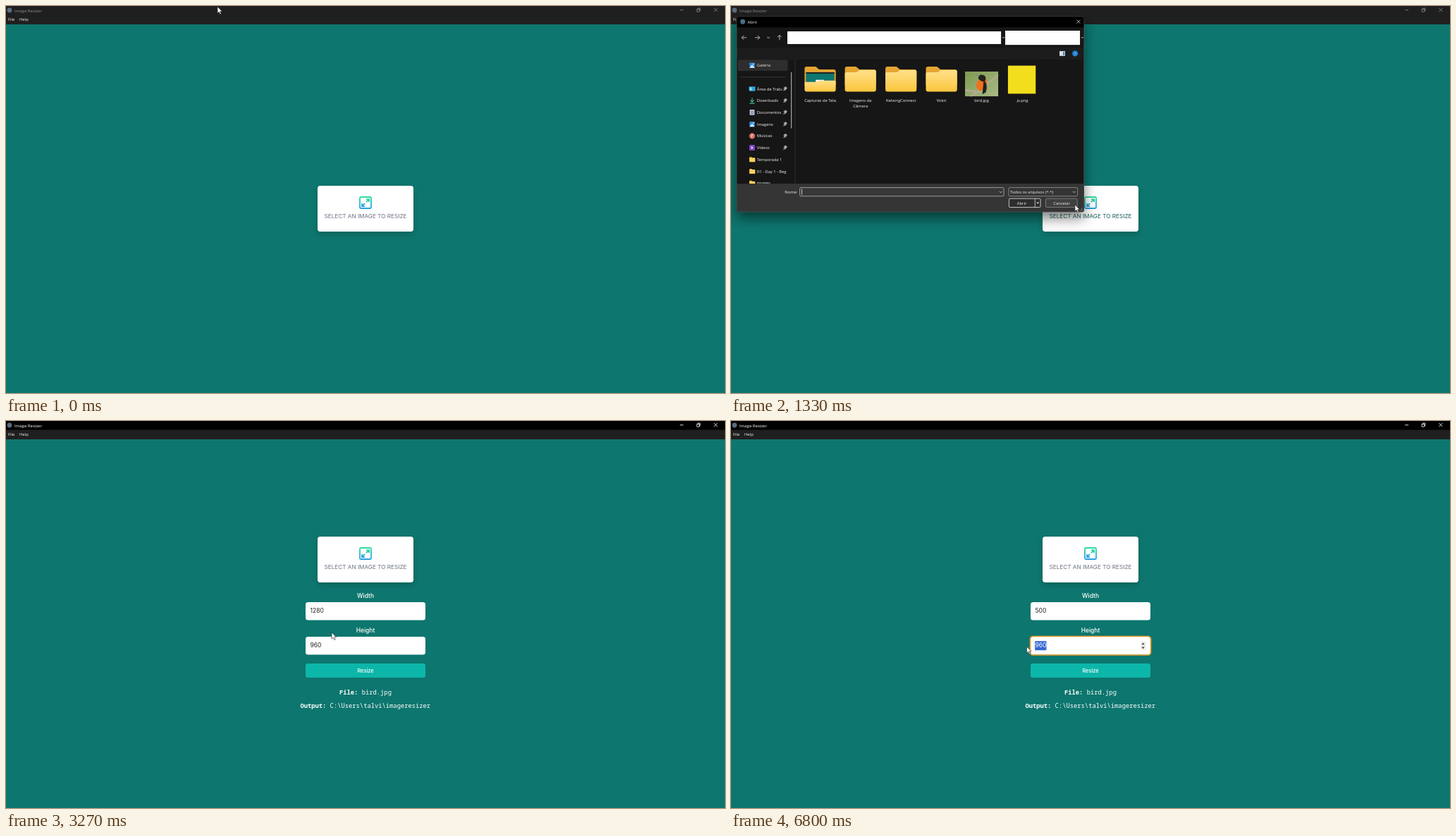
Recreate the animation shown at these times as an HTML page. Size 1020 by 549 pixels, loop 8000 ms.

```html
<!DOCTYPE html>
<html lang="en">
<head>
<meta charset="utf-8">
<title>Image Resizer</title>
<style>
html, body { margin: 0; width: 100%; height: 100%; overflow: hidden; background: #0d766e; }
svg { display: block; width: 100vw; height: 100vh; }
text { white-space: pre; }
.ui { font-family: "Open Sans", "Noto Sans", sans-serif; font-size: 5.9px; fill: #f2f2f2; }
.app { font-family: Inter, sans-serif; font-size: 8.5px; }
.mono { font-family: "Noto Sans Mono", "DejaVu Sans Mono", monospace; font-size: 8.8px; fill: #fff; }
.line { fill: none; stroke: #ddd; stroke-width: .8; }
</style>
</head>
<body>
<svg id="stage" viewBox="0 0 1020 549" preserveAspectRatio="none"></svg>
<script>
const LOOP = 8000, STEP = 1000 / 15;
const stage = document.getElementById('stage');

const rect = (x, y, w, h, fill, more = '') =>
  `<rect x="${x}" y="${y}" width="${w}" height="${h}" fill="${fill}" ${more}/>`;
const line = (d, more = '') => `<path class="line" d="${d}" ${more}/>`;
const dot = (x, y, r, fill) => `<circle cx="${x}" cy="${y}" r="${r}" fill="${fill}"/>`;
const label = (x, y, s, more = '') => `<text class="ui" x="${x}" y="${y}" ${more}>${s}</text>`;
const mid = 'text-anchor="middle"';
const chevron = (x, y, r = 2) => line(`M${x - r} ${y - r / 2}l${r} ${r} ${r} ${-r}`);
const caretDown = (x, y) => `<path d="M${x - 2} ${y - 1}h4l-2 2.3z" fill="#ddd"/>`;

const defs = `<defs>
  <linearGradient id="icon" x1="0" y1="0" x2="0" y2="1">
    <stop offset="0" stop-color="#2fdca0"/><stop offset="1" stop-color="#2a9fe4"/></linearGradient>
  <linearGradient id="fold" x1="0" y1="0" x2="0" y2="1">
    <stop offset="0" stop-color="#ffe08a"/><stop offset="1" stop-color="#fbc63d"/></linearGradient>
  <linearGradient id="meadow" x1="0" y1="0" x2="1" y2="1">
    <stop offset="0" stop-color="#7e9a52"/><stop offset="1" stop-color="#a9bb86"/></linearGradient>
  <filter id="soft" x="-20%" y="-20%" width="140%" height="150%">
    <feDropShadow dx="0" dy="4" stdDeviation="5" flood-opacity=".17"/></filter>
  <filter id="deep" x="-10%" y="-10%" width="120%" height="130%">
    <feDropShadow dx="0" dy="9" stdDeviation="9" flood-opacity=".5"/></filter>
  <clipPath id="win"><rect x="4" y="12" width="502" height="283" rx="4"/></clipPath>
  <clipPath id="side"><rect x="4" y="74" width="84" height="180"/></clipPath>
  <clipPath id="photo"><rect x="334" y="92" width="48" height="36"/></clipPath>
</defs>`;

function topBar() {
  return rect(0, 0, 1020, 26, '#201f1f') + rect(0, 0, 1020, 12.5, '#000', 'id="bar"') +
    dot(5, 6, 3.4, '#5a6b82') +
    label(12, 8.5, 'Image Resizer', 'id="title" style="font-size:6px"') +
    label(3, 21.2, 'File') + label(19, 21.2, 'Help') +
    `<g id="winBtns" fill="none" stroke-width=".8">
      <path d="M956 5.7h5M1004.3 3l5 5m0-5l-5 5M980 4.5h3.6v3.6h-3.6zM981.3 4.3v-1.2h3.5v3.5h-1"/></g>`;
}

function card() {
  return `<g id="card">` + rect(442, 255, 136, 65, '#fff', 'rx="4" filter="url(#soft)"') +
    `<g fill="none" stroke="url(#icon)" stroke-width="1.8" stroke-linejoin="round">
      <rect x="502" y="271" width="16" height="16" rx="1.5"/>
      <path d="M511 278l4-4m-4 .1h4.2v4M509 280l-4 4m0-4v4.2h4"/></g>
    <text id="pick" class="app" x="510" y="300.8" ${mid} style="font-size:8.2px">SELECT AN IMAGE TO RESIZE</text></g>`;
}

const field = (id, y) => rect(425, y, 170, 25.5, '#fff', 'rx="3.5"') +
  rect(424.5, y - .5, 171, 26.5, 'none', `id="${id}Ring" rx="4" stroke="#eda02f" stroke-width="1.7"`) +
  rect(431.2, y + 6.2, 0, 13, '#3367d1', `id="${id}Sel"`) +
  `<text id="${id}" class="app" x="431.5" y="${y + 15.4}"></text>` +
  rect(431, y + 6.2, .6, 13, '#222', `id="${id}Caret"`) +
  `<g id="${id}Spin">` + rect(581, y + 6.5, 8, 12.5, '#f0f0f0') +
  `<path d="M582.4 ${y + 11.2}h4.4l-2.2-2.6zM582.4 ${y + 14.6}h4.4l-2.2 2.6z" fill="#444"/></g>`;

function form() {
  const head = (y, s) => `<text class="app" x="510" y="${y}" ${mid} fill="#fff" font-weight="500">${s}</text>`;
  const info = (x, y, name, value) =>
    `<text class="mono" x="${x}" y="${y}"><tspan font-weight="700">${name}:</tspan> ${value}</text>`;
  return `<g id="form">` + head(250.8, 'Width') + field('w', 257) + head(300, 'Height') + field('h', 306) +
    rect(425, 344, 170, 20, '#0cb6a9', 'rx="3"') +
    `<text class="app" x="510" y="356.7" ${mid} fill="#fff" font-weight="500" style="font-size:7.4px">Resize</text>` +
    info(473, 387.5, 'File', 'bird.jpg') +
    info(417.4, 406.8, 'Output', 'C:\\Users\\talvi\\imageresizer') + `</g>`;
}

function folder(cx, names, filled) {
  const x = cx - 22.5;
  return `<path d="M${x} 88q0-3 3-3h13l5 4h21q3 0 3 3v20h-45z" fill="#e5a532"/>` +
    (filled ? rect(x + 2, 93, 41, 20, '#0d766e') + rect(x + 2, 93, 41, 2, '#202020') + rect(x + 16, 104, 12, 3, '#fff')
      + `<path d="M${x} 109q0-2 2-2h15l4-2h22q2 0 2 2v11q0 3-3 3h-39q-3 0-3-3z" fill="url(#fold)"/>`
      : `<path d="M${x} 95q0-2 2-2h15l4-3h22q2 0 2 2v26q0 3-3 3h-39q-3 0-3-3z" fill="url(#fold)"/>`) +
    names.map((n, i) => label(cx, 136 + i * 8, n, mid)).join('');
}

function bird() {
  return `<g clip-path="url(#photo)">` + rect(334, 92, 48, 36, 'url(#meadow)') +
    `<path d="M340 130L384 96M334 119l24 3" stroke="#b5aa93" stroke-width="2.4" fill="none"/>
    <ellipse cx="358" cy="110" rx="7" ry="10" transform="rotate(28 358 110)" fill="#f0701f"/>
    <path d="M361 105q7 5 3 17l-5 3q1-11 2-20z" fill="#22201f"/>
    <path d="M353 102q1-7 7-5t3 9q-5 2-10-4z" fill="#22201f"/>
    <path d="M354 98l-4-2 4 4z" fill="#778"/></g>`;
}

const miniPic = (x, y) => rect(x - 3.8, y - 3.8, 7.6, 7.6, '#2f8fdd', 'rx="1"') +
  `<path d="M${x - 3.8} ${y + 3.8}l3.8-4.6 3.8 4.6z" fill="#d9eefc"/>` + dot(x + 1.8, y - 1.8, .8, '#fff');
const miniFolder = (x, y) => rect(x - 4, y - 3.5, 4, 3, '#e5a532', 'rx=".8"') +
  rect(x - 4, y - 2.4, 8.4, 6, '#fdd05c', 'rx=".8"');

function sidebar() {
  const glyph = [
    y => rect(22, y - 3.2, 9, 6.4, '#2fa3dc', 'rx=".8"') + rect(23, y - 2, 3, 4, '#8fdcf5'),
    y => line(`M26.5 ${y - 4}v6m-2.6-2.6l2.6 2.6 2.6-2.6M23 ${y + 4}h7`, 'style="stroke:#3cc08c;stroke-width:1.1"'),
    y => rect(23, y - 4, 7, 8, '#b9c6d4', 'rx=".8"') + line(`M24.5 ${y - 1.5}h4m-4 1.8h4m-4 1.8h4`, 'style="stroke:#56708c"'),
    y => miniPic(26.5, y),
    y => dot(26.5, y, 4.2, '#d5705f') + line(`M26 ${y + 2}v-4l2 .8`, 'style="stroke:#fff"'),
    y => rect(22.5, y - 4, 8, 8, '#8244c9', 'rx="1"') + `<path d="M25.3 ${y - 1.8}l3 1.8-3 1.8z" fill="#fff"/>`
  ];
  const names = ['Área de Traba', 'Downloads', 'Documentos', 'Imagens', 'Músicas', 'Vídeos',
    'Temporada 1', '01 - Day 1 - Beg', 'images'];
  const pin = y => `<path d="M71.5 ${y + 2.5}l2-2-1.5-1.5 2.8-2.3 2.2 2.2-2.3 2.8z" fill="#aaa" stroke="#aaa" stroke-width=".5"/>`;
  let s = rect(6, 75, 72, 16, '#2e2e2e', 'rx="2"') + miniPic(26.5, 83) + label(33.5, 85.2, 'Galeria') +
    line('M10 100H74', 'style="stroke:#3c3c3c"');
  names.forEach((n, i) => {
    const y = 117 + i * 17;
    s += (glyph[i] ? glyph[i](y) : miniFolder(26.5, y)) + label(33.5, y + 2.2, n);
    if (i < 6) s += (i ? '' : rect(70, y - 4, 8, 8, '#191919')) + pin(y);
  });
  return `<g clip-path="url(#side)">${s}</g>` + rect(82.5, 93, 1.2, 81, '#a5a5a5') + rect(88, 74, .8, 180, '#333');
}

function dialog() {
  const box = (x, y, w, h, stroke, fill = 'none') => rect(x, y, w, h, fill, `rx="1.5" stroke="${stroke}" stroke-width=".8"`);
  const blank = `<g id="blank">` + rect(4, 12, 502, 15, '#000') + rect(4, 27, 502, 227, '#fff') + rect(4, 254, 502, 41, '#222') +
    [[73, 260.6, 19.5, 8], [95, 258, 295, 13], [396, 258, 101, 13], [396, 274, 47, 13.5], [450, 274, 47, 13.5], [497, 285, 9, 9]]
      .map(b => rect(...b, '#fff')).join('') + dot(13, 20, 3.5, '#47708a') + label(20, 22.5, 'Abrir') +
    line('M496 17.5l5 5m0-5l-5 5') + `</g>`;
  const nav = line('M18.5 43h-7m3-3l-3 3 3 3M30.5 43h7m-3-3l3 3-3 3M66 46.5v-7m-3 3l3-3 3 3') + chevron(50, 43);
  const late = `<g id="late">` + box(77.4, 34.4, 308, 17.6, '#4a4a4a') + box(392.4, 34.4, 106.6, 17.6, '#4a4a4a') +
    miniPic(86, 43) + line('M94.5 41.2l1.8 1.8-1.8 1.8M130.5 41.2l1.8 1.8-1.8 1.8') +
    label(101, 45.2, 'Imagens') + chevron(355, 43.5) +
    line('M377.6 42a2.9 2.9 0 1 0 .2 2M378 39.8v2.4h-2.4') +
    label(397, 45.2, 'Pesquisar em Imagens', 'style="fill:#858585"') +
    line('M487.6 44.2l-2.2 2.2M487.6 44.2a2 2 0 1 0 .1 0') +
    label(14, 68, 'Organizar') + caretDown(46, 66) + label(64, 68, 'Nova pasta') +
    rect(441.5, 62.5, 8, 7, '#ddd') + rect(443, 64, 5, 4, '#777') + caretDown(457, 66) + `</g>`;
  const early = `<g id="early">` + rect(77.4, 34, 308.6, 18.3, '#fff') + rect(392, 33, 108, 20.5, '#fff') +
    line('M388 43h3M502 43h3') + `</g>`;
  const files = rect(331, 77.5, 55, 61.5, '#777', 'id="pickBg" rx="1.5"') +
    folder(124.8, ['Capturas de Tela'], true) + folder(183, ['Imagens da', 'Câmera']) +
    folder(241.5, ['KelvorgConnect']) + folder(300, ['Vokri']) + bird() + label(358, 136, 'bird.jpg', mid) +
    rect(396, 83.5, 40, 40.5, '#f2de1d') + label(417, 136, 'js.png', mid);
  const foot = rect(4, 254, 502, 41, '#343434') + label(92, 268, 'Nome:', 'text-anchor="end"') +
    box(95.4, 259.6, 294.6, 12.4, '#b5b5b5', '#383838') + chevron(385.5, 266) +
    label(98, 268, 'bird.jpg', 'id="fileName"') + rect(98, 261.5, .7, 8.5, '#fff', 'id="nameCaret"') +
    box(397, 259.6, 99.5, 12.4, '#9a9a9a', '#343434') + label(399, 268, 'Todos os arquivos (*.*)') + chevron(491.5, 266) +
    box(397.5, 275.5, 45.5, 12.6, '#eee', '#2e2e2e') + line('M435 275.5v12.6') + caretDown(439, 282) +
    label(416, 284, 'Abrir', mid) + box(450.5, 275.5, 45.5, 12.6, '#8d8d8d', '#414141') + label(473.5, 284, 'Cancelar', mid) +
    line('M500 293l4-4M502.5 293l1.5-1.5', 'style="stroke:#999"');
  const full = `<g id="full">` + rect(4, 12, 502, 283, '#191919') + rect(4, 12, 502, 16.5, '#020202') +
    rect(4, 57.5, 502, 16.5, '#1f1f1f') + dot(13, 20, 3.5, '#47708a') + label(20, 22.5, 'Abrir', 'style="font-size:6px"') +
    line('M495.3 17.5l5 5m0-5l-5 5') + nav + late + early +
    rect(470.5, 62.5, 8, 7, '#ddd') + rect(475.5, 63.5, 2.2, 5, '#2f8fdd') +
    dot(493, 66, 4.2, '#1c7fd0') + label(493, 68.2, '?', mid) + sidebar() + files + foot + `</g>`;
  return `<g id="dialog" filter="url(#deep)"><g clip-path="url(#win)">${blank}${full}</g>
    <rect x="4.3" y="12.3" width="501.4" height="282.4" rx="4" fill="none" stroke="#555" stroke-width=".5"/></g>`;
}

const pointers = `<g id="mouse">
  <path id="arrow" d="M0 0v9.2l2.1-1.9 1.6 3.4 1.5-.7-1.5-3.3h2.9z" fill="#fff" stroke="#222" stroke-width=".6"/>
  <path id="beam" d="M-1.8-5h1.4l.4.5.4-.5h1.4M0-4.5v9M-1.8 5h1.4l.4-.5.4.5h1.4" fill="none" stroke="#333" stroke-width=".8"/>
  <path id="hand" d="M.2 1q.9-1 1.7 0v3.6l4 .9q.9.3.8 1.4l-.7 4.6h-4.600l-2.800-4q.1-1.300 1.600-.3z" fill="#fff" stroke="#222" stroke-width=".5"/>
</g>`;

stage.innerHTML = defs + rect(0, 0, 1020, 549, '#0d766e') + topBar() + card() + form() + dialog() + pointers;

const el = {};
stage.querySelectorAll('[id]').forEach(n => el[n.id] = n);
const show = (id, on) => el[id].setAttribute('display', on ? 'inline' : 'none');
const set = (id, name, v) => el[id].setAttribute(name, v);

// time, x, y of the mouse
const path = [[0, 300, 1], [800, 488, 282], [1334, 488, 282], [2000, 338, 136], [2330, 360, 122], [2600, 367, 116],
  [3000, 367, 116], [3270, 462, 300], [3400, 480, 344], [3530, 458, 269], [3600, 458, 269], [4000, 20, 536],
  [4330, 260.5, 249], [5867, 260.5, 249], [6330, 456, 318], [6400, 456, 318], [6800, 419.5, 320], [LOOP, 419.5, 320]];
// time, scale, opacity of the dialog
const fade = [[1200, .873, .22], [1267, .945, .75], [1333, .982, 1], [1400, .995, 1], [1467, 1, 1],
  [2600, 1, 1], [2667, .985, .75], [2733, .962, .45], [2800, .92, .15]];

function at(keys, t, ease) {
  const i = keys.findIndex(k => k[0] >= t);
  if (i < 0) return keys[keys.length - 1];
  if (i === 0) return keys[0];
  const a = keys[i - 1], b = keys[i], u = ease((t - a[0]) / (b[0] - a[0]));
  return a.map((v, j) => v + (b[j] - v) * u);
}

function input(id, y, value, focus, selecting, caret, x, my) {
  const over = x > 425 && x < 595 && my > y && my < y + 25.5;
  el[id].textContent = value;
  const end = 431.5 + el[id].getComputedTextLength();
  const from = Math.max(431.2, Math.min(end, x));
  const width = selecting ? end - from : 0;
  set(id + 'Sel', 'width', width);
  set(id, 'fill', width > 9 ? '#fff' : '#222');
  set(id + 'Caret', 'x', end + .2);
  show(id + 'Caret', caret);
  show(id + 'Ring', focus);
  show(id + 'Spin', focus || over);
  return over;
}

function draw(ms) {
  const t = Math.floor((ms + 5) / STEP) * STEP + 1;
  const [, x, y] = at(path, t, u => u * u * (3 - 2 * u));

  const active = (t > 930 && t < 1000) || t > 2660;
  set('bar', 'fill', active ? '#000' : '#201f1f');
  el.title.style.fill = active ? '#fff' : '#8f8f8f';
  set('winBtns', 'stroke', active ? '#fff' : '#8f8f8f');

  const ready = t > 2860;
  set('card', 'transform', `translate(0 ${ready ? -91 : 0})`);
  const onCard = !ready && (t > 1000 || (x > 442 && y > 255));
  set('pick', 'fill', onCard ? '#155f5a' : '#6b7280');
  show('form', ready);

  const open = t > 1200 && t < 2860;
  show('dialog', open);
  if (open) {
    const [, s, o] = at(fade, t, u => u);
    set('dialog', 'transform', `translate(${222 * (1 - s)} ${146 * (1 - s)}) scale(${s})`);
    set('dialog', 'opacity', o);
    show('blank', t < 1260);
    show('full', t > 1260);
    show('early', t < 1390);
    show('late', t > 1390);
    const chosen = t > 2460;
    show('pickBg', t > 2060);
    set('pickBg', 'fill', chosen ? '#777' : '#4d4d4d');
    show('fileName', chosen);
    show('nameCaret', t < 1860);
  }

  const typed = t < 5130 ? '1280' : '500'.slice(0, t < 5260 ? 1 : t < 5390 ? 2 : 3);
  const focusW = t > 3660 && t < 6460, focusH = t > 6460;
  const inW = input('w', 257, typed, focusW, focusW && t < 5130, focusW && t > 5130 && t < 5925, x, y);
  const inH = input('h', 306, '960', focusH, focusH, false, x, y);

  const beam = ready && (inW || inH), hand = t > 2660 && !ready;
  show('beam', beam);
  show('hand', hand);
  show('arrow', !beam && !hand);
  set('mouse', 'transform', `translate(${x} ${y})`);
}

const start = performance.now();
function tick() {
  draw((performance.now() - start) % LOOP);
  requestAnimationFrame(tick);
}
tick();
</script>
</body>
</html>
```
